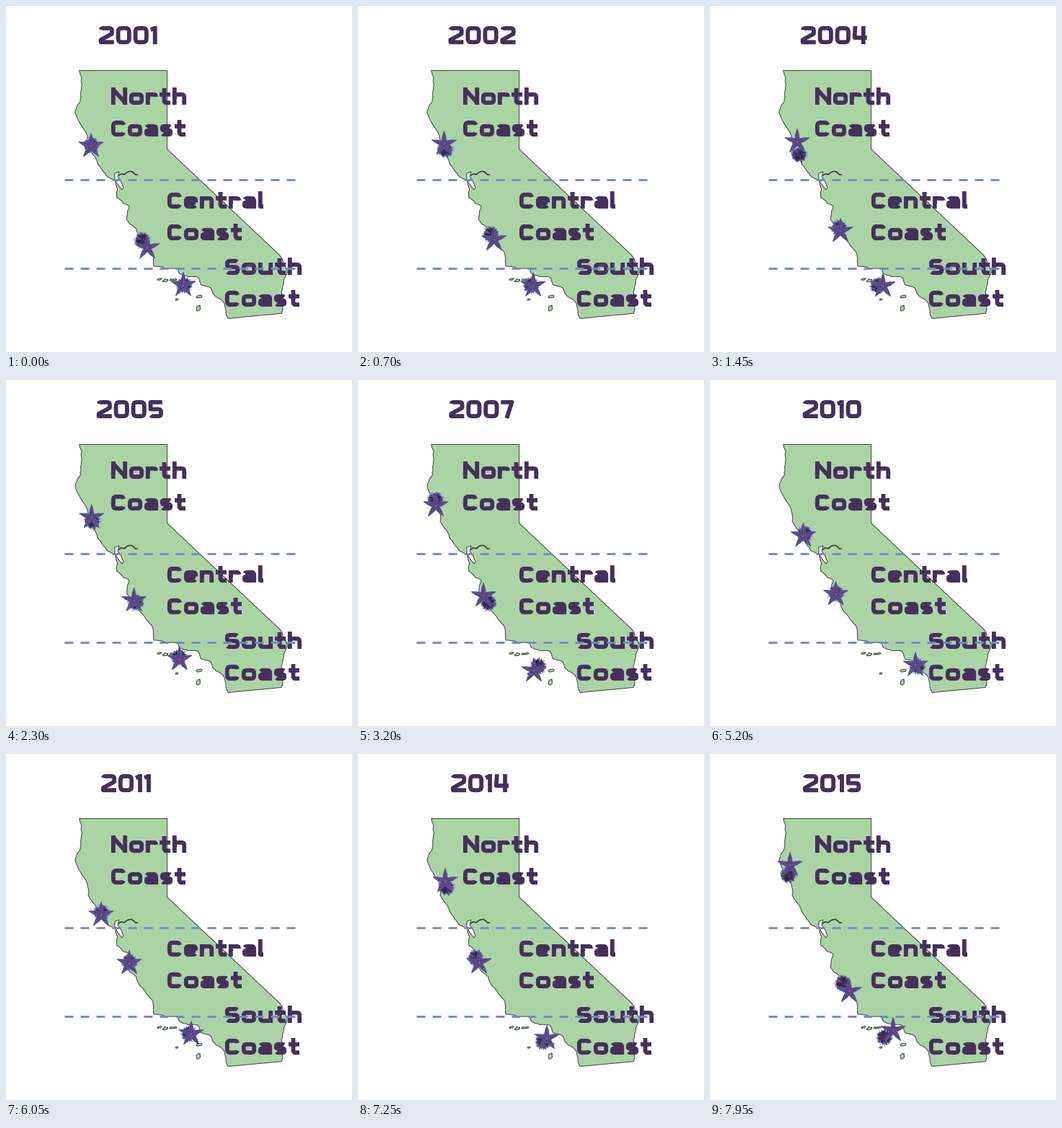
These frames come from a looping animation (480 by 480 pixels, 8 s). A matplotlib script:

```python
import numpy as np
import matplotlib
import matplotlib.pyplot as plt
from matplotlib.animation import FuncAnimation
from matplotlib.collections import LineCollection
from matplotlib.patches import Circle, PathPatch, Polygon
from matplotlib.path import Path
from matplotlib.transforms import Affine2D

matplotlib.rcParams["toolbar"] = "None"

SIZE, STEP, LOOP = 480, 50, 8000
YEAR_MS, YEAR_SHIFT = 585, 370
PX = 0.72  # points per pixel at 100 dpi
INK, LAND, EDGE, DASH = "#45305c", "#abd4a4", "#3c443c", "#7189d2"

fig = plt.figure(figsize=(4.8, 4.8), dpi=100, facecolor="white")
ax = fig.add_axes([0, 0, 1, 1])
ax.set(xlim=(0, SIZE), ylim=(SIZE, 0))
ax.axis("off")
rng = np.random.default_rng(7)


# ---- map ----
def rough(points, passes=3, amount=0.07):
    """Fractal shoreline: push every midpoint sideways, several times."""
    pts = np.array(points, float)
    for _ in range(passes):
        d = np.diff(pts, axis=0)
        side = np.column_stack([-d[:, 1], d[:, 0]])
        mids = pts[:-1] + d / 2 + side * rng.normal(0, amount, (len(d), 1))
        merged = np.empty((2 * len(pts) - 1, 2))
        merged[::2], merged[1::2] = pts, mids
        pts = merged
    return pts


def shape(points, color):
    ax.add_patch(Polygon(points, fc=color, ec=EDGE, lw=1 * PX))


border = [(101.5, 89.5), (223.5, 89.5), (223.5, 198.5)]
river = [(380, 346), (390, 367), (384, 388), (382, 426.5)]
shore = [(308, 433.5), (303, 413), (284, 391), (271, 387), (266, 376),
         (247, 374), (237, 364), (205, 361), (204, 345), (192, 328),
         (181, 309), (168, 297), (171, 278), (154, 266), (152, 243),
         (138, 233), (114, 196), (111, 175), (96, 148), (104, 125),
         (105, 100), (101.5, 89.5)]
shape(np.vstack([border, rough(river), rough(shore)]), LAND)

bay = [(151, 232), (157, 230), (155, 237), (163, 252), (161, 255), (151, 241)]
shape(rough(bay, 1), "white")
delta = rough([(157, 235), (166, 232), (182, 234)], 3, 0.2)
ax.plot(*delta.T, color=EDGE, lw=1.8 * PX)

turn = np.linspace(0, 2 * np.pi, 9)
for x, y, rx, ry in [(213, 379, 3, 1.5), (221, 381, 4, 2), (232, 380, 5, 1.5),
                     (237, 407, 2, 1), (268, 403, 4, 2), (267, 419, 3, 4)]:
    shape(rough(np.column_stack([x + rx * np.cos(turn + 0.4),
                                 y + ry * np.sin(turn)]), 1, 0.2), LAND)

for y in (241, 364):
    for x in range(81, 400, 22):
        ax.plot([x, x + 11.5], [y, y], color=DASH, lw=2.9 * PX,
                solid_capstyle="butt")


# ---- lettering: squarish bowls and straight strokes ----
X, CAP, H, D, W = 17, 22, 24, 25, 20  # heights of letters, digits; width
L, R, M = 2.8, W - 2.8, D / 2
GAP = 3


def bowl(h, start, stop, w=W, y=0):
    a = np.radians(np.linspace(start, stop, 33))
    c, s = np.cos(a), np.sin(a)
    px = w / 2 + (w / 2 - L) * np.sign(c) * np.abs(c) ** 0.45
    py = y + h / 2 + (h / 2 - L) * np.sign(s) * np.abs(s) ** 0.45
    return list(zip(px, py))


def upper(h, start, stop, w):
    return bowl(h / 2 + L, start, stop, w, h / 2 - L)


def lower(h, start, stop, w):
    return bowl(h / 2 + L, start, stop, w)


def ess(h, w):
    return [upper(h, 30, 270, w), lower(h, 90, -150, w)]


def stem(x, h):
    return [(x, 0), (x, h)]


def arch(w, start=180):
    return bowl(X, start, 0, w) + [(w - L, 0)]


GLYPHS = {
    "N": (22, [stem(L, H), [(L, H - 3), (22 - L, 3)], stem(22 - L, H)]),
    "C": (W, [bowl(CAP, 20, 335)]),
    "S": (W, ess(CAP, W)),
    "o": (W, [bowl(X, 0, 360)]),
    "r": (16, [stem(L, X), bowl(X, 180, 10, 17)]),
    "t": (15, [[(6.5, H - 1), (6.5, 5), (8, L), (15, L)],
               [(0, X - L), (15, X - L)]]),
    "h": (19, [stem(L, H), arch(19)]),
    "a": (19, [arch(19, 150), bowl(X / 2 + L, 0, 360, 19)]),
    "s": (17, ess(X, 17)),
    "e": (19, [bowl(X, 0, 325, 19), [(L, X / 2), (19 - L, X / 2)]]),
    "n": (19, [stem(L, X), arch(19)]),
    "l": (7, [[(L, H), (L, L), (7, L)]]),
    "u": (W, [[(L, X)] + bowl(X, 180, 360), stem(R, X)]),
    "0": (21, [bowl(D, 0, 360, 21)]),
    "1": (9, [stem(6, D), [(0, D - 5), (6, D - L)]]),
    "2": (21, [upper(D, 165, -20, 21) + [(L, 6), (L, L), (21, L)]]),
    "3": (21, [upper(D, 150, -90, 21), lower(D, 90, -150, 21)]),
    "4": (20, [[(L + 1, D), (L, 9), (20, 9)], stem(15, D)]),
    "5": (20, [[(19, D - L), (L, D - L), (L, M), (10, M)],
               lower(D, 90, -150, 20)]),
    "6": (21, [lower(D, 0, 360, 21), upper(D, 180, 60, 21)]),
    "7": (18, [[(0, D - L), (18 - L, D - L), (8, 0)]]),
    "8": (21, [upper(D, 0, 360, 21), lower(D, 0, 360, 21)]),
    "9": (21, [upper(D, 0, 360, 21), lower(D, 0, -120, 21)]),
}


def text_path(word, x, base):
    verts, codes = [], []
    for ch in word:
        width, strokes = GLYPHS[ch]
        for stroke in strokes:
            verts += [(x + px, base - py) for px, py in stroke]
            codes += [Path.MOVETO] + [Path.LINETO] * (len(stroke) - 1)
        x += width + GAP
    return Path(verts, codes)


def letter(path):
    return ax.add_patch(PathPatch(path, fill=False, ec=INK, lw=5.8 * PX,
                                  capstyle="butt", joinstyle="round"))


def year_path(year):
    word = str(year)
    width = sum(GLYPHS[c][0] + GAP for c in word) - GAP
    return text_path(word, 150.6 - 0.27 * width, 53)


for word, x, base in [("North", 146, 137), ("Central", 224, 281),
                      ("South", 304, 373)]:
    letter(text_path(word, x, base))
    letter(text_path("Coast", x, base + 44))
title = letter(year_path(2001))


# ---- sprites ----
class Sprite:
    def __init__(self, artists, z):
        self.artists = artists
        for artist in artists:
            artist.set_zorder(z)

    def move(self, x, y):
        shift = Affine2D().translate(x, y) + ax.transData
        for artist in self.artists:
            artist.set_transform(shift)


def rays(angle):
    return np.column_stack([np.sin(angle), -np.cos(angle)])


def spines(count, inner, outer, color):
    ray = rays(rng.uniform(0, 2 * np.pi, count))
    near = rng.uniform(inner / 2, inner, (count, 1))
    far = rng.uniform(outer * 0.75, outer, (count, 1))
    return ax.add_collection(LineCollection(
        np.stack([ray * near, ray * far], axis=1), colors=color,
        linewidths=PX), autolim=False)


def disc(r, color):
    return ax.add_patch(Circle((0, 0), r, fc=color, ec="none"))


def urchin():
    return Sprite([spines(60, 8, 12.5, "#8f9cda"), disc(9, "#5f5b9f"),
                   spines(60, 7, 11.5, "#504a8c"), disc(6.5, "#40305a"),
                   spines(30, 4, 9, "#745080"),
                   spines(34, 4, 9.5, "#322446")], 10)


TIPS = rays(np.arange(5) * 2 * np.pi / 5) * 17.7


def star_outline(waist, reach):
    """Five slim arms: two shoulders and a tip each, with notches between."""
    points = []
    for tip, after in zip(TIPS * reach, np.roll(TIPS, -1, axis=0) * reach):
        side = np.array([-tip[1], tip[0]]) / 17.7 * waist * 0.42
        notch = (tip + after) / np.hypot(*(tip + after)) * waist
        points += [tip * 0.6 - side, tip, tip * 0.6 + side, notch]
    return points


def star():
    arms = [[(0, 0), tip * 0.75] for tip in TIPS]
    return Sprite([
        ax.add_patch(Polygon(star_outline(5.2, 1), fc="#56509a", ec="#5a5ba6",
                             lw=1.2 * PX, joinstyle="round")),
        ax.add_patch(Polygon(star_outline(4.3, 0.92), fc="#53407c",
                             ec="none")),
        ax.add_collection(LineCollection(
            arms, colors="#80608f", linewidths=1.2 * PX,
            linestyles=(0, (1.6, 1))), autolim=False)], 11)


# ---- motion: star stops (time, x, y) and urchin offsets at shared times ----
TIMES = (0, 1450, 3200, 4350, 6050, 7250, 7950)
ROUTES = [
    ([(0, 118, 193), (1450, 121, 187), (2550, 118, 190), (2850, 102, 160),
      (3200, 108, 173), (4350, 139, 232), (5100, 129, 214), (6050, 132, 222),
      (6700, 133, 221), (7250, 121, 175), (7550, 106, 163), (7950, 111, 153)],
     [(1, 0), (3, 19), (0, -7), (4, -1), (1, -2), (2, 10), (-2, 15)]),
    ([(0, 196, 334), (1450, 181, 311), (3200, 174, 298), (4350, 178, 303),
      (6050, 171, 289), (7250, 168, 288), (7950, 193, 328)],
     [(-7, -9), (-2, -3), (7, 11), (0, 0), (0, 0), (-5, -5), (-9, -10)]),
    ([(0, 246, 386), (1450, 240, 387), (2550, 241, 386), (3200, 244, 402),
      (3550, 248, 407), (4350, 264, 392), (4750, 300, 398), (6050, 257, 387),
      (7250, 262, 393), (7650, 259, 389), (7950, 254, 382)],
     [(1, 1), (-7, 1), (6, -5), (8, 5), (-3, 1), (-5, 6), (-12, 11)]),
]
tracks = [(np.array(stops).T, np.array(gaps).T, urchin(), star())
          for stops, gaps in ROUTES]


def draw(frame):
    t = frame * STEP
    title.set_path(year_path(2001 + (t + YEAR_SHIFT) // YEAR_MS))
    for (when, xs, ys), (dx, dy), ball, arms in tracks:
        x, y = np.interp(t, when, xs), np.interp(t, when, ys)
        arms.move(x, y + 1.3)
        ball.move(x + np.interp(t, TIMES, dx), y + np.interp(t, TIMES, dy))
    return []


anim = FuncAnimation(fig, draw, frames=LOOP // STEP, interval=STEP,
                     repeat=True, repeat_delay=0, blit=False)
plt.show()
```
